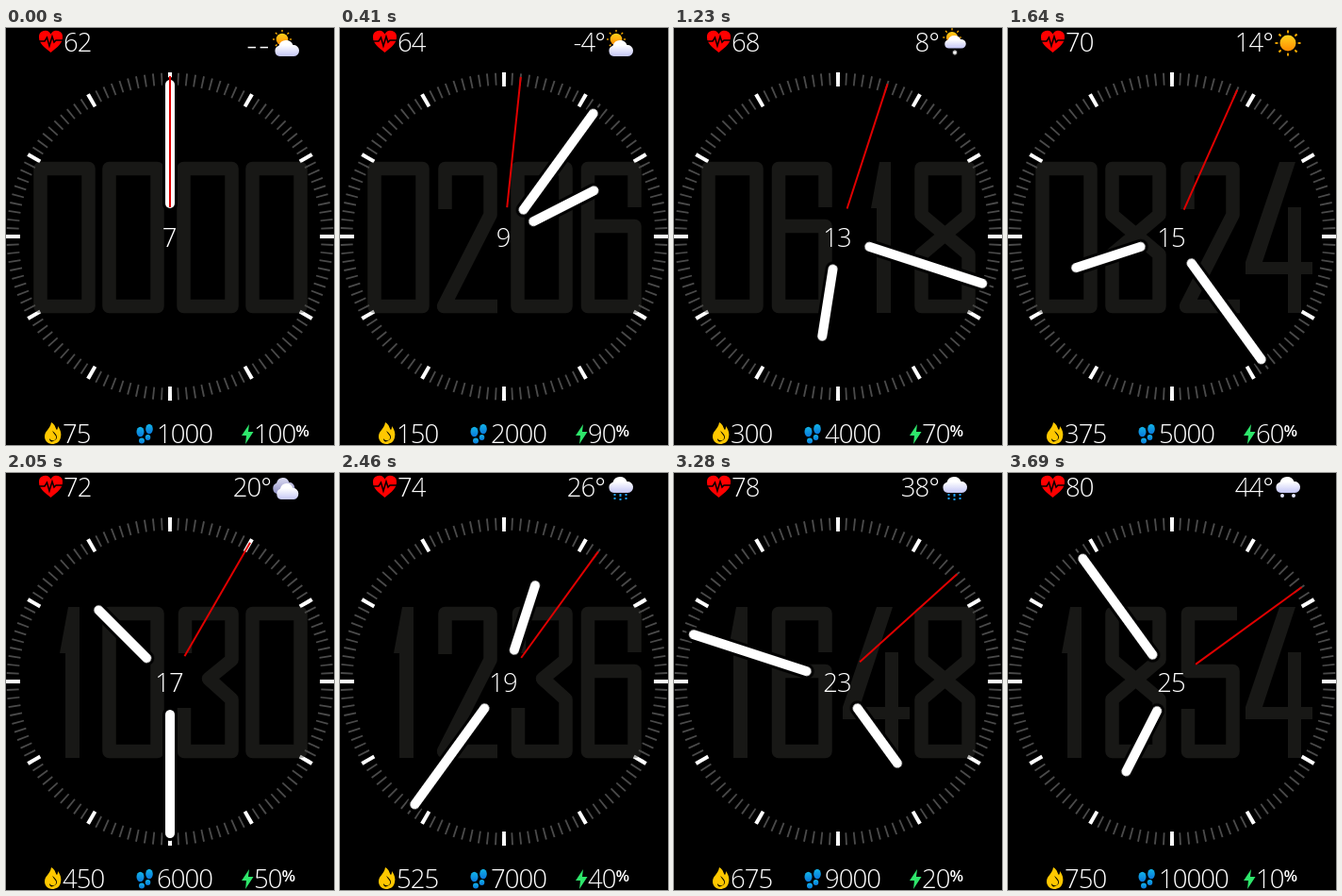
Recreate the animation shown at these times as an HTML page without scripts. Size 348 by 442 pixels, loop 4.1 s.

```html
<!DOCTYPE html>
<html lang="en">
<head>
<meta charset="utf-8">
<title>Watch face</title>
<style>
html, body { margin: 0; width: 100%; height: 100%; overflow: hidden; background: #000; }
svg { display: block; width: 100%; height: 100%; }
text { font: 300 27.5px "Open Sans", Lato, sans-serif; letter-spacing: -.95px; fill: #fff; }
.end { text-anchor: end; }
.mid { text-anchor: middle; }
.none { font-size: 36px; letter-spacing: 1.4px; }
.pct { font-size: 17px; font-weight: 600; }
.line { fill: none; stroke: rgba(60, 60, 56, .4); stroke-width: 14.5; stroke-linejoin: round; }
.solid { fill: rgba(60, 60, 56, .4); }

/* ten states, 410 ms each */
.state { visibility: hidden; animation: show 4100ms step-end calc(var(--k) * 410ms - 4100ms) infinite; }
@keyframes show {
  0% { visibility: visible; }
  10%, 100% { visibility: hidden; }
}
.hand { animation: turn 4100ms steps(10, end) infinite; }
.hour { --sweep: 630deg; }
.minute { --sweep: 360deg; }
.second { --sweep: 60deg; }
@keyframes turn {
  from { transform: rotate(0deg); }
  to { transform: rotate(var(--sweep)); }
}
.hand path { stroke: #fff; stroke-width: 10; stroke-linecap: round; }
.hand .edge { stroke: #000; stroke-width: 16; }
.second path { stroke: #e00000; stroke-width: 2; stroke-linecap: butt; }
</style>
</head>
<body>
<svg viewBox="0 0 348 442">
<defs>
  <linearGradient id="mist" x2="0" y2="1"><stop offset=".3" stop-color="#fff"/><stop offset="1" stop-color="#c4c6f6"/></linearGradient>
  <linearGradient id="dusk" x2="0" y2="1"><stop stop-color="#dcdcf2"/><stop offset="1" stop-color="#8f90c4"/></linearGradient>
  <linearGradient id="glow" x2="0" y2="1"><stop stop-color="#ffd21c"/><stop offset="1" stop-color="#ff8a00"/></linearGradient>
  <linearGradient id="step" x2="0" y2="1"><stop stop-color="#12b4e6"/><stop offset="1" stop-color="#0a78dc"/></linearGradient>

  <!-- numerals in a 66 x 160 box -->
  <path id="d0" class="line" d="M7.5 7H58.5V153H7.5Z"/>
  <path id="d1" class="solid" d="M37 0H49V160H34V49H28Z"/>
  <path id="d2" class="line" d="M9.5 50V7H57.5V56L8 153H65"/>
  <path id="d3" class="line" d="M9 49V7H58.5V56L34 76L58.5 98V153H8V107"/>
  <path id="d4" class="solid" d="M34 0H51L16 106H43V48H57V106H69V119H57V160H43V119H-2V106Z"/>
  <path id="d5" class="line" d="M62 7H10V68H57.5V153H10V108"/>
  <path id="d6" class="line" d="M58.5 48V7H9V153H58.5V68H9"/>
  <path id="d8" class="line" d="M8.5 7H58.5V56L8.5 98V153H58.5V98L8.5 56Z"/>

  <path id="cloud" d="M6.5 17A5.8 5.8 0 0 1 5.5 5.7A8 8 0 0 1 20.5 5A6 6 0 0 1 21.5 17Z"/>
  <g id="sun">
    <circle r="8.5" fill="url(#glow)"/>
    <circle r="12" fill="none" stroke="#ffb000" stroke-width="3" pathLength="8" stroke-dasharray=".2 .8" stroke-dashoffset=".1"/>
  </g>
  <path id="rain" d="M-6 0v2m0 2v2M0 0v3m0 2v2M6 0v2m0 2v2" stroke="#1b9cf0" stroke-width="2"/>
  <path id="flake" d="M0-2.5v5M-2.2-1.2l4.4 2.4M-2.2 1.2l4.4-2.4" stroke="#fff" stroke-width="1.3"/>

  <g id="partly">
    <use href="#sun" transform="translate(293 12) scale(.74)"/>
    <use href="#cloud" x="284" y="13" fill="url(#mist)"/>
  </g>
  <g id="sunCloud">
    <use href="#sun" transform="translate(295 11) scale(.72)"/>
    <use href="#cloud" transform="translate(286 9) scale(.88 .8)" fill="url(#mist)"/>
  </g>
  <g id="shower"><use href="#sunCloud"/><use href="#rain" x="298" y="24"/></g>
  <g id="sleet"><use href="#sunCloud" y="-1"/><use href="#flake" x="298" y="26"/></g>
  <use id="clear" href="#sun" x="297" y="16"/>
  <g id="cloudy">
    <use href="#cloud" transform="translate(282 5) scale(.9 1)" fill="url(#dusk)"/>
    <use href="#cloud" transform="translate(286 11) scale(.9 1)" fill="url(#mist)"/>
  </g>
  <use id="grey" href="#cloud" x="283" y="4" fill="url(#mist)"/>
  <g id="snow"><use href="#grey"/><use href="#flake" x="296.5" y="25"/></g>
  <g id="wet"><use href="#grey" x="1"/><use href="#rain" x="297.5" y="22"/></g>
  <g id="hail"><use href="#grey"/><path d="M291 24h0M303 24h0" stroke="#e4e6ff" stroke-width="4" stroke-linecap="round"/></g>
</defs>

<rect width="348" height="442"/>

<g fill="none" transform="translate(174 221)">
  <circle r="167" stroke="#4a4a4a" stroke-width="13" pathLength="120" stroke-dasharray=".21 .79" stroke-dashoffset=".105"/>
  <circle r="166.5" stroke="#fff" stroke-width="15" pathLength="12" stroke-dasharray=".046 .954" stroke-dashoffset=".023"/>
</g>

<path d="M47.500 26C40 20 35 16 35 10A6.600 6.600 0 0 1 47.500 6.500A6.600 6.600 0 0 1 60 10C60 16 55 20 47.500 26Z" fill="#f00"/>
<path d="M35 14h6l2.500-4 2.500 9 3-10 2 6 2-2h7" fill="none" stroke="#000" stroke-width="1.500"/>
<path d="M48 418c5 3 4 6 6 8 1-1 1-3 1-4 3 4 4 8 3 12-1 5-5 7-9 7-5 0-8-4-8-8 0-6 6-8 7-15z" fill="#ffc800"/>
<path d="M49 427c2 4 5 5 4 8-1 3-5 3-7 0 0 3 2 4 4 3 6-2 5-7-1-11z" fill="#000"/>
<g fill="url(#step)">
  <ellipse cx="142.500" cy="428" rx="4" ry="5.200"/><ellipse cx="144" cy="437.500" rx="3" ry="3"/>
  <ellipse cx="152" cy="425" rx="3.800" ry="5.200"/><ellipse cx="150.500" cy="434" rx="2.800" ry="3"/>
</g>
<path d="M258 420l-8 12h5l-1 9 8.500-13h-5.500z" fill="#2ee66b"/>

<g class="state" style="--k:0">
  <g transform="translate(0 142)"><use href="#d0" x="29"/><use href="#d0" x="102"/><use href="#d0" x="181"/><use href="#d0" x="254"/></g>
  <text x="61" y="25">62</text><text class="end none" x="281" y="30.500">--</text><use href="#partly"/>
  <text class="mid" x="173" y="231.500">7</text>
  <text x="60" y="440">75</text><text x="160" y="440">1000</text><text x="263" y="440">100<tspan class="pct" dy="-7">%</tspan></text>
</g>
<g class="state" style="--k:1">
  <g transform="translate(0 142)"><use href="#d0" x="29"/><use href="#d2" x="102"/><use href="#d0" x="181"/><use href="#d6" x="254"/></g>
  <text x="61" y="25">64</text><text class="end" x="281" y="25">-4°</text><use href="#partly"/>
  <text class="mid" x="173" y="231.500">9</text>
  <text x="60" y="440">150</text><text x="160" y="440">2000</text><text x="263" y="440">90<tspan class="pct" dy="-7">%</tspan></text>
</g>
<g class="state" style="--k:2">
  <g transform="translate(0 142)"><use href="#d0" x="29"/><use href="#d4" x="102"/><use href="#d1" x="181"/><use href="#d2" x="254"/></g>
  <text x="61" y="25">66</text><text class="end" x="281" y="25">2°</text><use href="#shower"/>
  <text class="mid" x="173" y="231.500">11</text>
  <text x="60" y="440">225</text><text x="160" y="440">3000</text><text x="263" y="440">80<tspan class="pct" dy="-7">%</tspan></text>
</g>
<g class="state" style="--k:3">
  <g transform="translate(0 142)"><use href="#d0" x="29"/><use href="#d6" x="102"/><use href="#d1" x="181"/><use href="#d8" x="254"/></g>
  <text x="61" y="25">68</text><text class="end" x="281" y="25">8°</text><use href="#sleet"/>
  <text class="mid" x="173" y="231.500">13</text>
  <text x="60" y="440">300</text><text x="160" y="440">4000</text><text x="263" y="440">70<tspan class="pct" dy="-7">%</tspan></text>
</g>
<g class="state" style="--k:4">
  <g transform="translate(0 142)"><use href="#d0" x="29"/><use href="#d8" x="102"/><use href="#d2" x="181"/><use href="#d4" x="254"/></g>
  <text x="61" y="25">70</text><text class="end" x="281" y="25">14°</text><use href="#clear"/>
  <text class="mid" x="173" y="231.500">15</text>
  <text x="60" y="440">375</text><text x="160" y="440">5000</text><text x="263" y="440">60<tspan class="pct" dy="-7">%</tspan></text>
</g>
<g class="state" style="--k:5">
  <g transform="translate(0 142)"><use href="#d1" x="29"/><use href="#d0" x="102"/><use href="#d3" x="181"/><use href="#d0" x="254"/></g>
  <text x="61" y="25">72</text><text class="end" x="281" y="25">20°</text><use href="#cloudy"/>
  <text class="mid" x="173" y="231.500">17</text>
  <text x="60" y="440">450</text><text x="160" y="440">6000</text><text x="263" y="440">50<tspan class="pct" dy="-7">%</tspan></text>
</g>
<g class="state" style="--k:6">
  <g transform="translate(0 142)"><use href="#d1" x="29"/><use href="#d2" x="102"/><use href="#d3" x="181"/><use href="#d6" x="254"/></g>
  <text x="61" y="25">74</text><text class="end" x="281" y="25">26°</text><use href="#wet"/>
  <text class="mid" x="173" y="231.500">19</text>
  <text x="60" y="440">525</text><text x="160" y="440">7000</text><text x="263" y="440">40<tspan class="pct" dy="-7">%</tspan></text>
</g>
<g class="state" style="--k:7">
  <g transform="translate(0 142)"><use href="#d1" x="29"/><use href="#d4" x="102"/><use href="#d4" x="181"/><use href="#d2" x="254"/></g>
  <text x="61" y="25">76</text><text class="end" x="281" y="25">32°</text><use href="#snow"/>
  <text class="mid" x="173" y="231.500">21</text>
  <text x="60" y="440">600</text><text x="160" y="440">8000</text><text x="263" y="440">30<tspan class="pct" dy="-7">%</tspan></text>
</g>
<g class="state" style="--k:8">
  <g transform="translate(0 142)"><use href="#d1" x="29"/><use href="#d6" x="102"/><use href="#d4" x="181"/><use href="#d8" x="254"/></g>
  <text x="61" y="25">78</text><text class="end" x="281" y="25">38°</text><use href="#wet"/>
  <text class="mid" x="173" y="231.500">23</text>
  <text x="60" y="440">675</text><text x="160" y="440">9000</text><text x="263" y="440">20<tspan class="pct" dy="-7">%</tspan></text>
</g>
<g class="state" style="--k:9">
  <g transform="translate(0 142)"><use href="#d1" x="29"/><use href="#d8" x="102"/><use href="#d5" x="181"/><use href="#d4" x="254"/></g>
  <text x="61" y="25">80</text><text class="end" x="281" y="25">44°</text><use href="#hail"/>
  <text class="mid" x="173" y="231.500">25</text>
  <text x="60" y="440">750</text><text x="160" y="440">10000</text><text x="263" y="440">10<tspan class="pct" dy="-7">%</tspan></text>
</g>

<g transform="translate(174 221)">
  <g class="hand hour"><path class="edge" d="M0-35V-107"/><path d="M0-35V-107"/></g>
  <g class="hand minute"><path class="edge" d="M0-35V-161"/><path d="M0-35V-161"/></g>
  <g class="hand second"><path d="M0-31V-170"/></g>
</g>
</svg>
</body>
</html>
```
